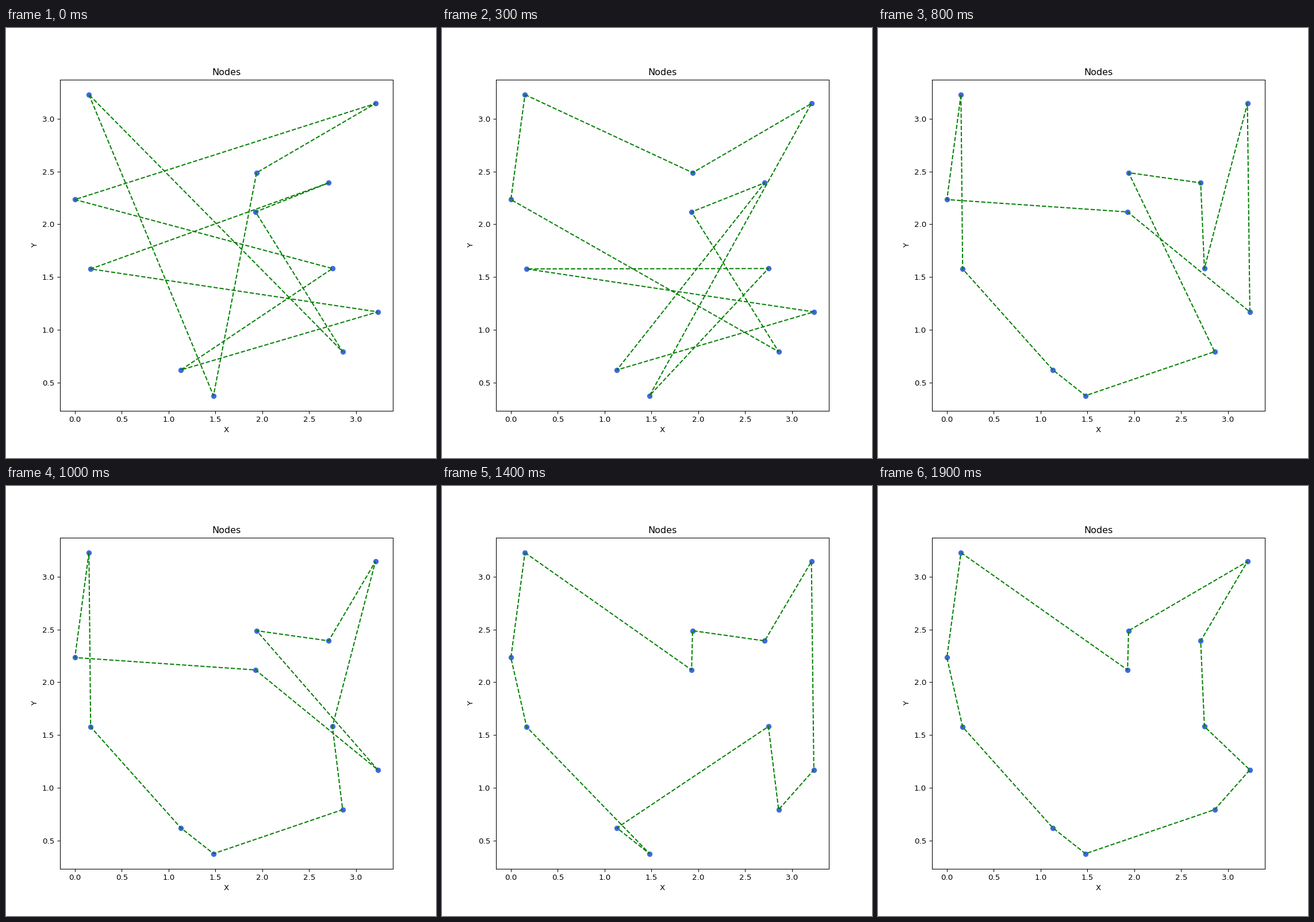
Recreate the animation shown at these times as a matplotlib script. Size 748 by 748 pixels, loop 2000 ms.

```python
import matplotlib.pyplot as plt
from matplotlib.animation import FuncAnimation

SIZE, DPI = 748, 96
STEP_MS = 100

NODES = {
    "A": (0.150, 3.226), "B": (3.207, 3.142), "C": (1.939, 2.488),
    "D": (2.708, 2.392), "E": (1.928, 2.117), "F": (0.000, 2.234),
    "G": (0.168, 1.578), "H": (2.748, 1.582), "I": (3.233, 1.172),
    "J": (2.857, 0.796), "K": (1.131, 0.623), "L": (1.479, 0.380),
}

# Visiting order at each step of the route search
TOURS = """
ALCBFHKIGDEJ ALCBFHGIKDEJ ALCBHGIKDEJF ACBLHGIKDEJF ALBCHDEJIKGF
ALCBHDEJIKGF ALEBHDCJIKGF AFLEBHDCJIKG AFEIBHDCJLKG AFEICDHBJLKG
AFEICDBHJLKG AIECDBHJLKGF AECDBIHJLKGF AECDBIHJKLGF AECDBIJHKLGF
AECDBHIJKLGF AECDBHIJLKGF ACEBDHIJLKGF ACEDBHIJLKGF AECBDHIJLKGF
""".split()


def closed_path(tour):
    return zip(*(NODES[n] for n in tour + tour[0]))


fig, ax = plt.subplots(figsize=(SIZE / DPI, SIZE / DPI), dpi=DPI)
ax.scatter(*zip(*NODES.values()), color="royalblue")
ax.set(title="Nodes", xlabel="X", ylabel="Y")
route, = ax.plot(*closed_path(TOURS[0]), "--", color="green")


def draw(i):
    route.set_data(*closed_path(TOURS[i]))
    return route,


anim = FuncAnimation(fig, draw, frames=len(TOURS), interval=STEP_MS,
                     repeat=True, repeat_delay=0)
plt.show()
```
